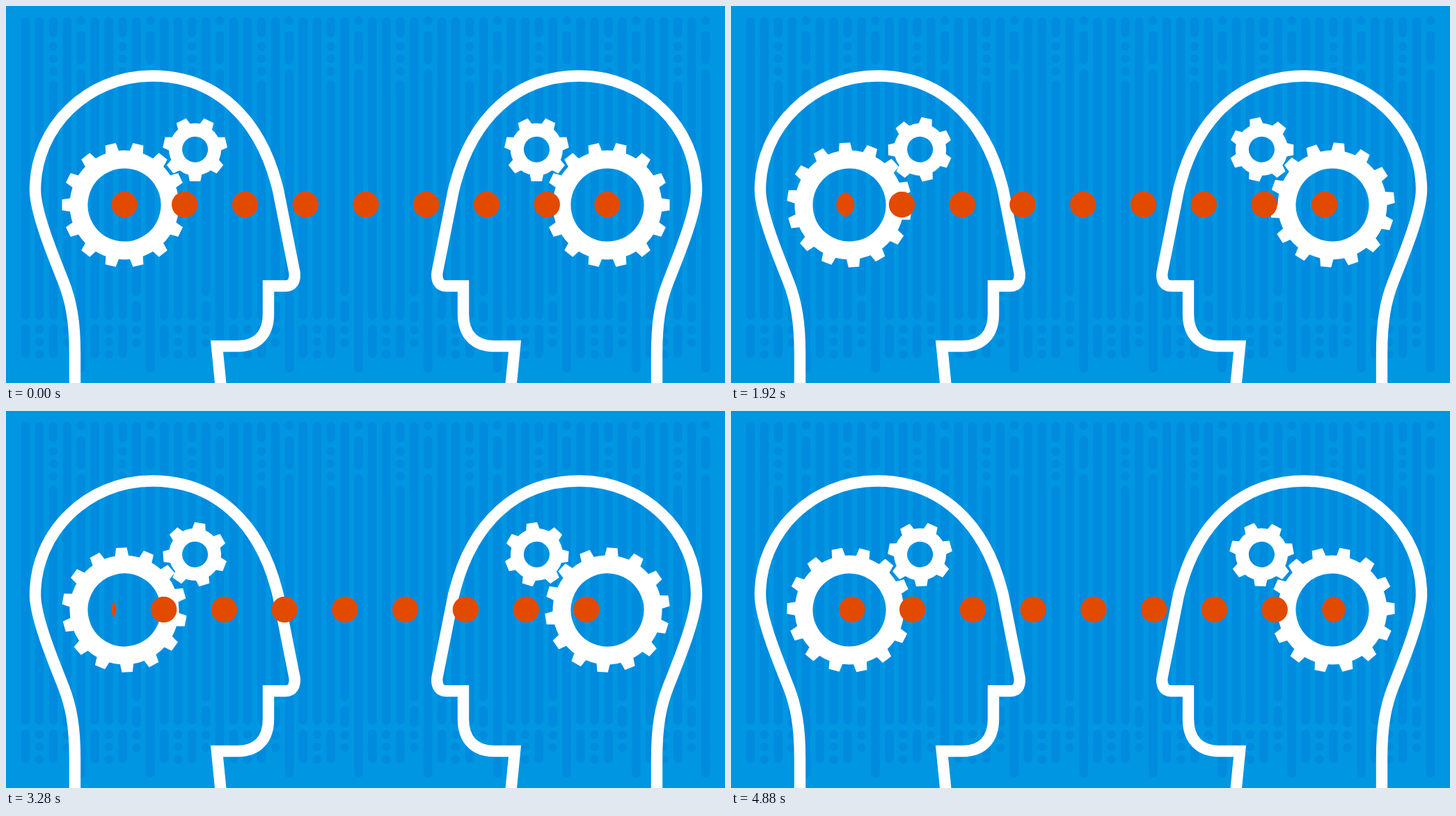
Animation of 1033 by 542 pixels, one loop 4.96 s. Source, as an HTML page:

```html
<!DOCTYPE html>
<html lang="en">
<head>
<meta charset="utf-8">
<title>Exchange of ideas</title>
<style>
  html, body { margin: 0; width: 100%; height: 100%; overflow: hidden; background: #0096e1; }
  svg { display: block; width: 100%; height: 100%; }
</style>
</head>
<body>
<svg viewBox="0 0 1033 542" preserveAspectRatio="none">
  <clipPath id="track"><rect x="151.3" y="266.8" width="731.4" height="37.4" rx="18.7"/></clipPath>
  <path id="stripes" fill="none" stroke="#008bde" stroke-width="12.5" stroke-linecap="round"/>
  <path id="head" fill="none" stroke="#fff" stroke-width="16.4" d="M99 550V500C99 455 94 425 82 395
    C66 355 42 296 42 264C42 174 117 100.5 210 100.5C300 100.5 366 160 391 265L414.5 383
    C416 395 411 402.5 402 402.5H377V443C377 472 361 489 333 489H303L309 550"/>
  <use href="#head" transform="matrix(-1 0 0 1 1034 0)"/>
  <g id="gears" fill="#fff"></g>
  <g clip-path="url(#track)">
    <path id="dots" d="M83.25 285.5H1000" fill="none" stroke="#e24a00" stroke-width="37.4"
      stroke-linecap="round" stroke-dasharray="0 86.75"/>
  </g>
</svg>
<script>
const $ = id => document.getElementById(id);
const STEP = 80, LOOP = 4960, GAP = 86.75, WIDTH = 1034;

// Background: five kinds of column, repeated
const pill = (x, top, bottom) => `M${x} ${top + 6.2}V${bottom - 6.2}`;
const beads = (x, y, n) => Array.from({ length: n }, (_, k) => `M${x} ${y + 18 * k}v.1`).join('');
const kinds = [
  x => pill(x, 16, 451) + pill(x, 458, 506),
  x => pill(x, 16, 451) + beads(x, 465, 3),
  x => pill(x, 16, 45) + beads(x, 58, 3) + pill(x, 107, 451) + pill(x, 458, 506),
  x => pill(x, 16, 417) + pill(x, 424, 455) + beads(x, 466, 2),
  x => beads(x, 21, 1) + pill(x, 36, 84) + pill(x, 91, 527)
];
let stripes = '';
for (let i = 0; i < 50; i++) stripes += kinds[i % 5](28 + i * 19.94);
$('stripes').setAttribute('d', stripes);

// Returns a function that turns the new gear
function gear(x, y, teeth, hole, root, tip) {
  const g = document.createElementNS('http://www.w3.org/2000/svg', 'g');
  g.innerHTML = `<circle r="${(hole + root) / 2}" fill="none" stroke="#fff" stroke-width="${root - hole}"/>`;
  for (let i = 0; i < teeth; i++) {
    g.innerHTML += `<path transform="rotate(${i * 360 / teeth})"
      d="M-10 ${3 - root}L-7.7 ${-tip}H7.7L10 ${3 - root}Z"/>`;
  }
  $('gears').append(g);
  return angle => g.setAttribute('transform', `translate(${x} ${y}) rotate(${angle})`);
}
const big = x => gear(x, 286, 14, 52.5, 78.5, 89.5);
const small = x => gear(x, 206.2, 7, 18.5, 37.5, 45.8);
const bigLeft = big(170), bigRight = big(WIDTH - 170);
const smallLeft = small(271.6), smallRight = small(WIDTH - 271.6);

function draw(now) {
  const n = Math.floor(now % LOOP / STEP);
  const turn = n * 2.93;
  const lag = 2 * Math.sin(Math.PI * n * STEP / LOOP);
  const bigAngle = 180 / 14 - turn, smallAngle = 180 / 7 + 2 * turn;
  bigLeft(bigAngle + lag);
  bigRight(-bigAngle);
  smallLeft(smallAngle);
  smallRight(-smallAngle);
  $('dots').setAttribute('stroke-dashoffset', n * 11.313 % GAP);
  requestAnimationFrame(draw);
}
draw(0);
</script>
</body>
</html>
```
